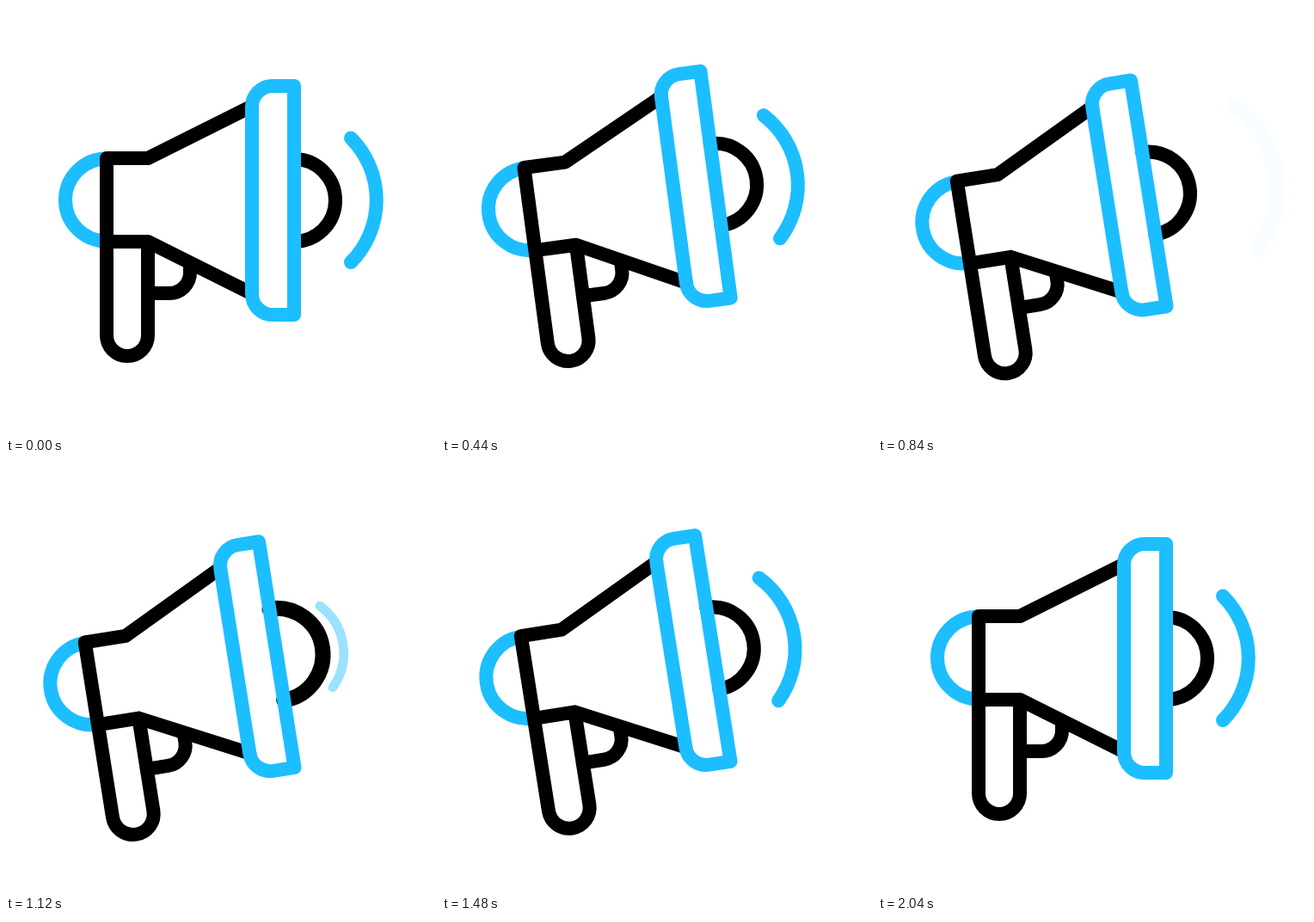
Write an HTML page that moves like this. It is 500 px wide and 500 px high and loops after 2160 ms.

```html
<!DOCTYPE html>
<html>
<head>
<meta charset="utf-8">
<style>
  html, body { margin: 0; height: 100%; overflow: hidden; background: #fff; }
  svg { display: block; width: 100vw; height: 100vh; }
  g { fill: none; stroke: #000; stroke-width: 16; stroke-linecap: round; stroke-linejoin: round; }
  .blue { stroke: #1cbeff; }
</style>
</head>
<body>
<svg viewBox="0 0 500 500">
  <g id="horn">
    <path class="blue" d="M117 177.5a48 48 0 0 0 0 96"/>
    <path id="mouth" d="M335 178a48 48 0 0 1 0 96"/>
    <path d="M165 334h25a24 24 0 0 0 24-24v-10"/>
    <path d="M286 116.500L165 177H117V383a24 24 0 0 0 48 0V274M117 274H165L286 334.500"/>
    <path class="blue" d="M335 93H310a24 24 0 0 0-24 24V335a24 24 0 0 0 24 24H335Z"/>
    <path id="wave" class="blue" d="M401 153.500a102.500 102.500 0 0 1 0 144.500"/>
  </g>
</svg>
<script>
const LOOP = 2160, STEP = 40;
const [horn, mouth, wave] = ["horn", "mouth", "wave"].map(id => document.getElementById(id));

const part = (t, a, b) => Math.min(1, Math.max(0, (t - a) / (b - a)));
const ease = (t, a, b) => { const p = part(t, a, b); return p * p * (3 - 2 * p); };
const hump = (t, a, b) => Math.sin(Math.PI * part(t, a, b));
const scaleAt = (s, x, y) => `translate(${x} ${y}) scale(${s}) translate(${-x} ${-y})`;

function draw(t) {
  const tilt = 9 * (ease(t, 60, 565) - ease(t, 1465, 2020));
  const sink = 17 * hump(t, 490, 1720);
  horn.setAttribute("transform", `translate(0 ${sink}) rotate(${-tilt} 189 344)`);
  mouth.setAttribute("transform", scaleAt(1 + 0.12 * hump(t, 800, 1440) ** 2, 335, 226));

  // The wave drifts away and fades, then a new one grows from the mouth.
  const out = ease(t, 480, 880), grow = ease(t, 880, 1400);
  const leaving = t < 880;
  wave.setAttribute("transform", leaving
    ? `translate(${50 * out} 0) ` + scaleAt(1 + 0.17 * out, 401, 226)
    : scaleAt(0.4 + 0.6 * grow, 378, 226));
  wave.setAttribute("opacity", leaving ? 1 - out : grow);
}

const start = performance.now();
function tick() {
  const t = (performance.now() - start) % LOOP;
  draw(Math.floor(t / STEP) * STEP);
  requestAnimationFrame(tick);
}
tick();
</script>
</body>
</html>
```
